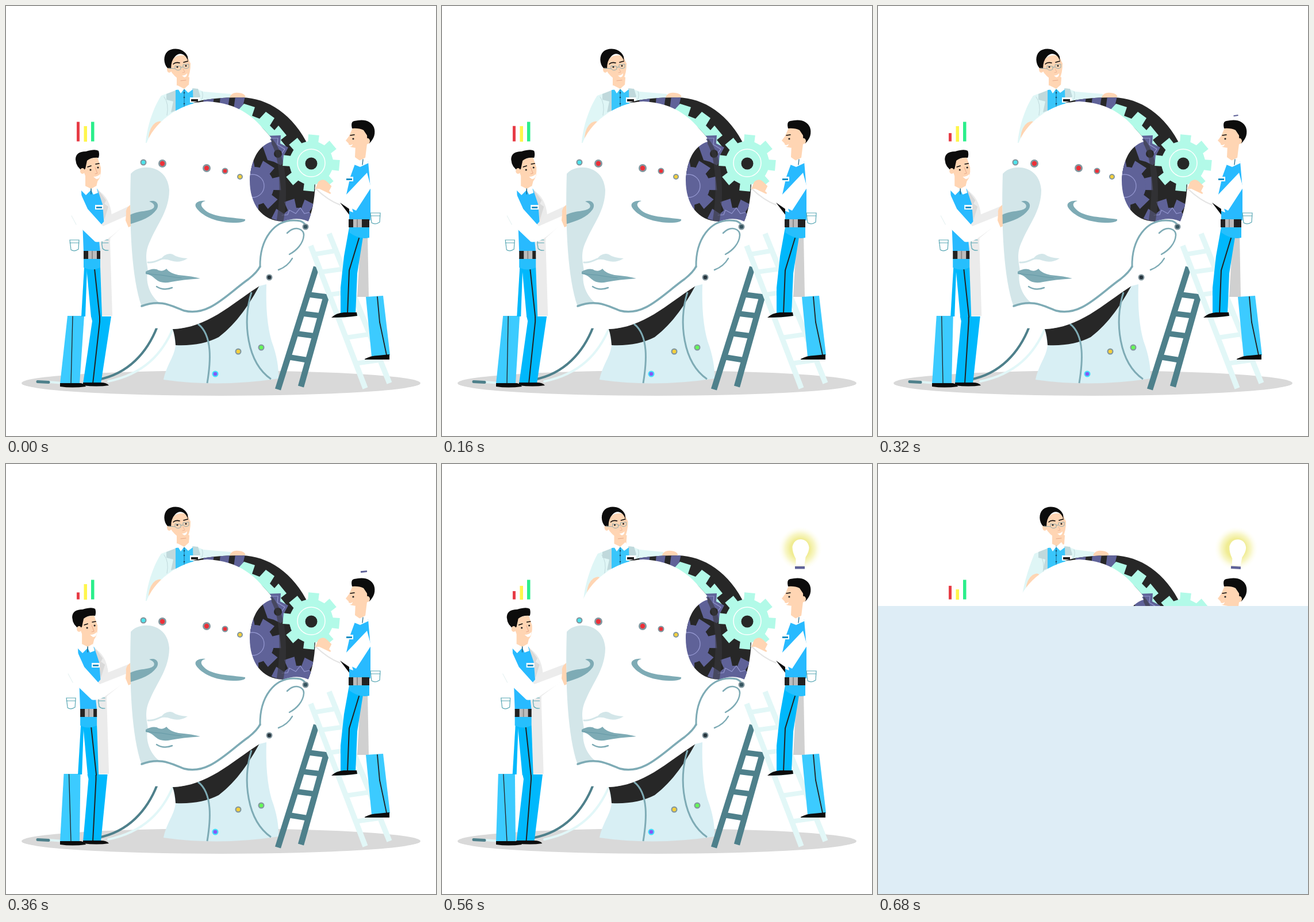
These frames come from a looping animation (748 px wide and 748 px high, 720 ms). An HTML page with a canvas:

```html
<!DOCTYPE html>
<html lang="en">
<head>
<meta charset="utf-8">
<title>Robot workshop</title>
<style>
html, body { margin: 0; width: 100%; height: 100%; overflow: hidden; background: #fff; }
canvas { display: block; width: 748px; height: 748px; }
</style>
</head>
<body>
<canvas id="stage" width="748" height="748"></canvas>
<script>
const ctx = document.getElementById('stage').getContext('2d');
const LOOP = 720, STEP = 40;
const SKIN = '#ffd5b3', HAIR = '#0c0c0c', BLUE = '#00b8fc', SKY = '#3ccbff', TEAL = '#7eabb5',
  DEEP = '#4e808b', ICE = '#d8eff4', COAT = '#dff6f6', SHADE = '#d3e6e9', MINT = '#b2fae8',
  VIOLET = '#5f6298', LILAC = '#9497d0', DARK = '#272727', INK = '#222';

const ease = (t, from, to) => {
  const p = Math.min(1, Math.max(0, (t - from) / (to - from)));
  return p * p * (3 - 2 * p);
};

function fill(d, color) {
  ctx.fillStyle = color;
  ctx.fill(new Path2D(d));
}
function line(d, color, width, cap = 'round') {
  ctx.strokeStyle = color;
  ctx.lineWidth = width;
  ctx.lineCap = cap;
  ctx.stroke(new Path2D(d));
}
function disc(x, y, r, color, ry = r) {
  ctx.fillStyle = color;
  ctx.beginPath();
  ctx.ellipse(x, y, r, ry, 0, 0, 7);
  ctx.fill();
}
function ring(x, y, r, color, width) {
  ctx.strokeStyle = color;
  ctx.lineWidth = width;
  ctx.beginPath();
  ctx.arc(x, y, r, 0, 7);
  ctx.stroke();
}
function rect(x, y, w, h, color) {
  ctx.fillStyle = color;
  ctx.fillRect(x, y, w, h);
}
function led(x, y, r, color, rim = '#83979f') {
  disc(x, y, r, rim);
  disc(x, y, r * 0.6, color);
}
function gear(x, y, outer, inner, teeth, start, half, color) {
  ctx.beginPath();
  for (let i = 0; i < teeth; i++) {
    const a = start + i * 2 * Math.PI / teeth;
    for (const [r, o] of [[inner, -half - 0.05], [outer, -half], [outer, half], [inner, half + 0.05]])
      ctx.lineTo(x + r * Math.cos(a + o), y + r * Math.sin(a + o));
  }
  ctx.closePath();
  ctx.fillStyle = color;
  ctx.fill();
  disc(x, y, inner, color);
}
function shifted(dx, dy, draw) {
  ctx.save();
  ctx.translate(dx, dy);
  draw();
  ctx.restore();
}

function floor() {
  disc(374, 656, 347, '#d9d9d9', 22);
  line('M291 560C272 605 240 640 178 653', '#e2f7f8', 4);
  line('M263 558C246 602 213 640 160 650', DEEP, 4);
  line('M75 654L100 656', '#dff5f6', 4);
  line('M55 653.5L74 654.5', DEEP, 5);
}

function topMan(t) {
  const s = ease(t, 440, 720) / 0.945;
  const arm = 7 * s, hand = -15 * s;
  fill(`M${243 + arm} 238C${246 + arm} 205 ${258 + arm} 174 ${270 + arm * 0.3} 156L300 145L328 143L344 149L${391 + hand} 153L${394 + hand} 161L345 182L280 205L250 238Z`, COAT);
  fill('M279 153L297 146L298 181L287 185L291 166L279 163Z', '#c0d9dc');
  fill('M321 143L334 144L338 157L328 175L323 170Z', '#c0d9dc');
  line(`M${275 + arm} 158Q${284 + arm} 170 ${280 + arm} 190`, '#c0d9dc', 1);
  line('M341 149Q344 155 340 164', '#c0d9dc', 1);
  fill('M295 146L325 144L326 184L295 186Z', '#39c6fb');
  line('M310 141V176', '#176d99', 1);
  for (const y of [151, 159, 170]) disc(310, y, 1.3, '#12506f');
  rect(320, 159, 17, 9, '#fff');
  rect(322, 162, 12, 4, INK);
  shifted(9 * s, -10 * s, () => fill('M248 228Q250 210 260 203Q269 198 272 203Q260 213 248 230Z', SKIN));
  shifted(hand, 0, () => fill('M389 158Q394 149 405 151Q415 152 417 158Q407 162 392 162Z', SKIN));
  shifted(6 * s, 0, () => {
    fill('M297 117L319 124L318 139L310 145L297 139Z', SKIN);
    fill('M286 99Q294 82 315 87L321 100Q321 116 316 126Q311 132 305 130Q292 123 286 112Z', SKIN);
    disc(284, 110, 4, SKIN, 6);
    fill('M281 108C274 101 273 86 281 79C290 71 310 73 316 88L317 99C315 83 301 79 294 88Q287 95 287 109Z', HAIR);
    line('M304 130L313 129', '#e8a889', 1);
    line('M291 101Q295 97 302 99M309 98L316 96', HAIR, 1.6);
    disc(298, 106, 1.6, INK);
    disc(313, 104, 1.6, INK);
    line('M283 108L294 109L294 104L304 105L304 110Q298 114 294 109M304 107L308 106L308 102L318 101L318 107Q312 111 308 106', '#91aaaa', 1);
    line('M308 109L311 115L307 116', '#eeb597', 1);
    fill('M306 121Q312 121 315 117Q315 124 310 124Z', '#fff');
  });
  fill('M296 139L298 138L310 144L304 152Z', '#fff');
  fill('M310 144L319 136L325 145L317 151Z', '#fff');
}

function helmet() {
  ctx.save();
  const shell = new Path2D('M325 168Q355 159 410 159C455 160 500 188 527 245Q538 278 538 310Q536 352 525 376H470C440 372 422 345 424 300Q428 250 462 230Q410 165 325 168Z');
  ctx.fillStyle = DARK;
  ctx.fill(shell);
  ctx.clip(shell);
  fill('M345 158H362L360 172H342ZM373 157H389L386 178H371ZM399 157H416L409 187H395Z', VIOLET);
  fill('M414 170L433 176L428 191L441 196L452 184L467 195L459 208L467 216L474 208L488 225L478 233L490 248L450 232L405 180Z', MINT);
  fill('M450 226L478 225L477 239L491 246L483 261L489 267L478 277L466 271L455 268L445 240Z', VIOLET);
  line('M454 230H473L472 241L485 249L477 260', LILAC, 1.2);
  disc(473, 257, 7, DARK);
  gear(433, 313, 46, 33, 7, -0.1, 0.26, VIOLET);
  ring(429, 313, 20, LILAC, 1.3);
  gear(507, 382, 47, 31, 8, -1.1, 0.2, VIOLET);
  line('M480 364L490 363L493 355L504 361L512 351L519 361L528 359', LILAC, 1.2);
  fill('M462 230C492 260 490 340 482 377H470C478 335 479 270 462 240Z', 'rgba(55,55,60,.6)');
  ctx.restore();
}

function neck() {
  fill('M290 562L440 478L453 484Q451 545 462 583Q475 618 474 648Q370 664 274 650Q276 637 288 613Q295 598 295 588Z', ICE);
  fill('M290 562C340 561 390 515 441 486C425 516 402 552 370 576Q339 592 295 590Q294 573 290 562Z', DARK);
  line('M334 553C360 573 356 620 350 656', TEAL, 3, 'butt');
  line('M427 498C411 550 419 620 461 649', TEAL, 3, 'butt');
  led(404, 601, 5.5, '#f4cf3b');
  led(444, 594, 5.5, '#63f957');
  led(364, 640, 5.5, '#8458f5', '#43ddfb');
}

function face() {
  fill('M244 240C255 207 298 168 350 166C403 168 440 195 462 236C439 243 424 270 424 303C424 345 445 374 482 375Q510 364 532 378L527 405Q492 460 453 484L441 487C390 520 350 560 290 562L250 560L236 523C214 460 210 300 244 240Z', '#fff');
  fill('M217 292C232 273 281 275 284 320C284 355 264 378 251 408C239 432 246 448 247 461C241 482 253 507 267 516Q249 515 236 523C219 475 214 385 217 292Z', SHADE);
  fill('M213 365C232 354 249 359 257 351C260 345 254 342 249 340C261 336 268 345 262 354C252 368 236 373 214 380Z', TEAL);
  fill('M347 339C339 341 337 346 344 353C358 368 390 367 416 371Q418 377 395 377C362 376 340 364 331 351C326 343 335 338 347 339Z', TEAL);
  fill('M268 442Q278 428 290 432Q298 438 316 439Q302 448 287 443Q277 439 268 442Z', SHADE);
  line('M247 446Q256 447 270 440', SHADE, 3);
  fill('M243 462Q253 456 262 458Q271 464 279 457Q285 465 300 468Q325 470 338 474Q307 476 287 480Q270 484 260 475Q252 467 243 466Z', TEAL);
  line('M244 465Q258 468 270 468Q285 471 305 473', '#659aa7', 1);
  line('M262 488Q274 496 289 490', TEAL, 2.5);
  line('M236 522C270 509 290 523 310 530C353 541 386 500 422 475Q437 463 442 453', TEAL, 3.5);
  line('M442 454C441 410 464 366 512 374Q520 377 522 384', TEAL, 3);
  line('M489 395C503 381 519 388 518 399C517 413 506 425 493 432M498 439Q490 453 474 459', TEAL, 2.5);
  led(521, 384, 5.5, '#35545f');
  led(458, 472, 5.5, '#26343d');
  led(239, 272, 5.5, '#4ce4ec');
  led(272, 274, 7, '#ec3038');
  led(349, 282, 7, '#ec3038');
  led(381, 287, 5.5, '#ec3038');
  led(407, 297, 5, '#f4cf3b');
}

function ladders() {
  line('M540 454L473 667M558 502L513 662', DEEP, 10.5, 'butt');
  line('M527 502L558 506M516 535L548 539M507 570L537 574M494 611L525 616', DEEP, 9.5, 'butt');
  line('M530 417L625 665M562 396L667 656', '#e2f7f7', 9.5, 'butt');
  line('M536 432L578 425M546 463L590 457M564 502L606 496M579 540L621 534M591 577L632 571M607 622L650 616', '#e2f7f7', 8, 'butt');
}

function mintGear() {
  gear(531, 273, 50, 38, 8, -1.48, 0.19, MINT);
  ring(531, 273, 24, '#fff', 1.5);
  disc(531, 274, 10.5, DARK);
}

function pocket(x, y, w) {
  line(`M${x} ${y}H${x + w}L${x + w - 1} ${y + 16}Q${x + w / 2} ${y + 21} ${x + 2} ${y + 17}ZM${x} ${y + 5}H${x + w}`, '#58a7b4', 1.2);
}
function belt(x, y, w) {
  rect(x, y, w, 14, INK);
  rect(x + 8, y, 15, 14, '#bcbcbc');
  rect(x + 14, y, 2, 14, '#8c8c8c');
}
function badge(x, y) {
  rect(x, y, 14, 8, '#fff');
  rect(x + 2, y + 3, 10, 3, '#178fc4');
}

function rightMan() {
  fill('M617 395L629 397L631 506H611Z', '#d0d0d0');
  fill('M626 506L656 504L668 607L636 610Z', SKY);
  line('M646 506L650 550L662 607', INK, 1.8);
  fill('M624 614Q635 608 647 608L667 606L667 615H624Z', HAIR);
  fill('M597 385L621 402L611 465L608 536H582L582 490L588 435Z', BLUE);
  fill('M597 383H632V403Q615 407 597 394Z', '#26bffd');
  line('M614 404L597 460L594 536', INK, 2);
  fill('M566 542Q574 534 588 533H610L611 539Q592 542 566 542Z', HAIR);
  fill('M607 275L630 270L634 318V373H597V345L592 328L599 297Z', '#28baff');
  belt(596, 371, 36);
  fill('M537 317L545 307L598 339L604 359Q572 349 537 317Z', '#fff');
  line('M539 318Q560 338 581 346', '#e4e4e4', 2);
  fill('M543 306Q552 298 560 307L571 318L564 327L545 318L538 318Z', SKIN);
  fill('M628 290L635 316L609 356Q585 346 562 322L568 310L592 328Z', '#fff');
  fill('M581 342L597 353V363Z', HAIR);
  badge(590, 297);
  pocket(634, 360, 17);
  fill('M608 241L628 240L625 264L612 270L607 263Z', SKIN);
  fill('M603 212L630 213L632 238Q617 249 603 246Q595 245 596 239L591 234L597 226Z', SKIN);
  fill('M602 213Q599 201 606 200Q632 194 640 211Q645 226 632 239Q628 236 628 225L622 216Q614 212 602 213Z', HAIR);
  disc(629, 235, 4, SKIN, 5);
  line('M599 225L606 224', HAIR, 1.6);
  disc(604, 231, 1.6, INK);
  fill('M595 240Q599 244 603 240Q602 246 596 244Z', '#fff');
  fill('M607 263L617 270L626 263L631 273L616 280L606 276Z', '#fff');
  line('M621 267L620 276', '#246d8e', 1.3);
}

function leftManLegs(dx, foot) {
  const top = dx * 1.1;
  const knee = top - foot * 0.25;
  fill(`M${107 + top} 539H${136 + top}L128 657H94Z`, SKY);
  line(`M${116 + top} 540L113 657`, INK, 1.3);
  fill(`M${148 + knee} 540L${150 + knee} 548L${134 + foot} 657H${165 + foot}L${183 + knee} 540Z`, BLUE);
  line(`M${163 + knee} 540V549L${151 + foot} 657`, INK, 2);
  fill('M94 656H130Q136 657 139 662Q115 665 94 662Z', HAIR);
  shifted(foot, 0, () => fill('M134 655H165Q175 655 179 660Q158 663 134 660Z', HAIR));
}

function leftMan(t) {
  const dx = -8.4 * ease(t, 80, 520) + 8.4 * ease(t, 520, 1120);
  const foot = -7 * ease(t, 440, 640);
  leftManLegs(dx, foot);
  shifted(dx, 0, () => {
    fill('M159 320Q181 332 184 365L181 410L185 539H165L158 420Z', '#ebebeb');
    fill('M160 319L174 338L171 344L178 349L171 372Z', '#d9d9d9');
    fill('M136 455H141L138 540H131Z', BLUE);
    fill('M140 455H164L167 541H148Z', BLUE);
    line('M154 457L163 541', INK, 2);
    fill('M135 438H164V455Q149 462 135 455Z', '#26bffd');
    fill('M131 321L142 316L159 318L168 345L171 384L161 400L164 428H135Z', '#28baff');
    belt(135, 426, 29);
    pocket(111, 407, 16);
    line('M178 407H167Q166 414 168 422Q172 426 178 425M167 412H178', '#58a7b4', 1.2);
    badge(155, 346);
    fill('M138 294L160 302L157 314L148 320L138 314Z', SKIN);
    fill('M136 268L159 263L165 281Q166 296 160 304Q152 310 144 303Q136 296 135 285Z', SKIN);
    fill('M134 287Q122 281 121 267Q121 253 139 253Q155 248 161 252Q163 258 161 264Q148 263 141 269L138 283Z', HAIR);
    disc(133, 287, 4, SKIN, 5);
    line('M142 280L148 278M156 275L162 274', HAIR, 1.6);
    disc(147, 285, 1.6, INK);
    disc(160, 281, 1.6, INK);
    line('M155 281L159 291L155 292', '#e8a889', 1);
    fill('M152 297Q160 297 164 292Q164 301 157 301Z', '#fff');
    fill('M131 321L138 313L148 318L157 313L160 325L152 328L148 320L139 329Z', '#fff');
    line('M148 318V327', '#246d8e', 1.6);
  });
  fill(`M${165 + dx} 381L${180 + dx} 364L214 348L215 372L${180 + dx} 405Z`, '#ececec');
  fill(`M${128 + dx} 322L${142 + dx} 353L${169 + dx} 383L214 363L215 374L${184 + dx} 400Q${167 + dx} 413 ${155 + dx} 410L${134 + dx} 390L${112 + dx} 360Z`, '#fff');
  line(`M${114 + dx} 365L${122 + dx} 380`, '#e7f2f2', 1.2);
  fill('M216 346Q207 353 209 361L208 373L213 385L217 383Z', SKIN);
}

function bars(t) {
  const red = 34 - 24 * ease(t, 0, 440) + 24 * ease(t, 440, 880);
  const yellow = 27 - 16 * ease(t, 440, 880);
  rect(123, 235.5 - red, 5, red, '#e73c46');
  rect(135.5, 236 - yellow, 5.5, yellow, '#fff64c');
  rect(148, 201.5, 5.5, 34, '#2bee8b');
}

function bulb(t) {
  if (t < 320) return;
  const grow = Math.min(1, 0.65 + 0.35 * (t - 360) / 80);
  const glow = Math.min(1, Math.max(0, (t - 440) / 120));
  if (glow) {
    const g = ctx.createRadialGradient(623, 147, 8, 623, 147, 38);
    g.addColorStop(0, '#f0ec94');
    g.addColorStop(0.3, '#f0ec94');
    g.addColorStop(0.6, 'rgba(244,241,165,.6)');
    g.addColorStop(0.82, 'rgba(250,248,205,.25)');
    g.addColorStop(1, 'rgba(255,255,230,0)');
    ctx.globalAlpha = glow;
    disc(623, 147, 38, g);
    ctx.globalAlpha = 1;
  }
  ctx.save();
  ctx.translate(622.5, 180 + 20 * (1 - grow));
  ctx.scale(grow, grow);
  ctx.rotate(t >= 680 ? 0.05 : -0.3 * (1 - grow));
  fill('M-7 -4L-7 -15Q-13 -26 -13 -36Q-10 -49 2 -49Q14 -48 16 -35Q16 -27 10 -18L8 -4Z', '#fff');
  rect(-8.5, -2, 17, 4.5, VIOLET);
  ctx.restore();
}

function draw(t) {
  rect(0, 0, 748, 748, '#fff');
  floor();
  topMan(t);
  helmet();
  neck();
  face();
  ladders();
  mintGear();
  bulb(t);
  rightMan();
  leftMan(t);
  bars(t);
  if (t >= 680) rect(0, 247, 748, 501, '#deedf6');
}

function tick(now) {
  draw(Math.floor((now % LOOP) / STEP) * STEP);
  requestAnimationFrame(tick);
}
draw(0);
requestAnimationFrame(tick);
</script>
</body>
</html>
```
